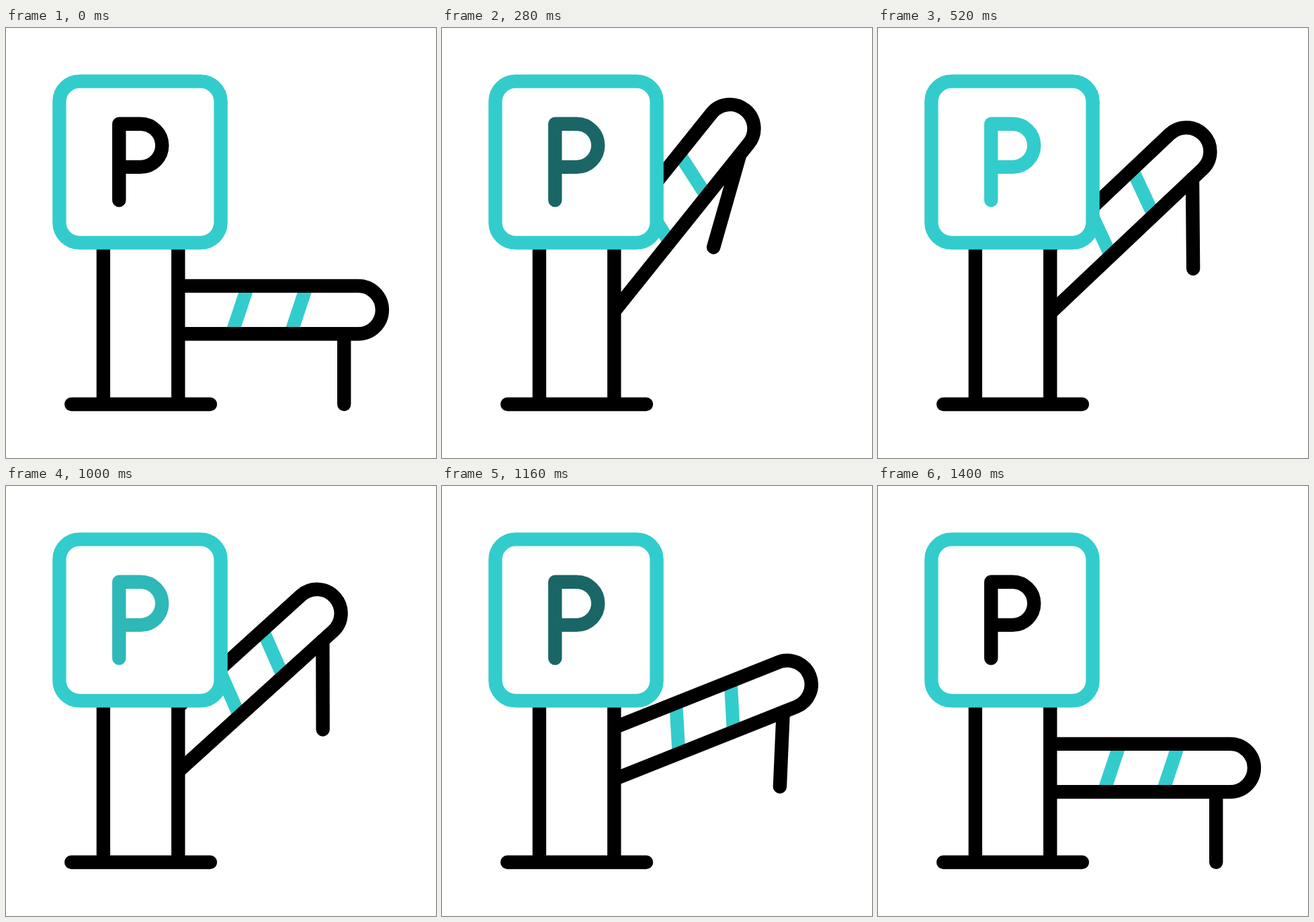
Recreate the animation shown at these times as an HTML page. Size 640 by 640 pixels, loop 2000 ms.

```html
<!DOCTYPE html>
<html lang="en">
<head>
<meta charset="utf-8">
<title>Parking barrier</title>
<style>
  html, body { margin: 0; height: 100%; overflow: hidden; background: #fff; }
  svg { display: block; width: 100%; height: 100%; }
  .line { fill: none; stroke: #000; stroke-width: 20.4; stroke-linecap: round; stroke-linejoin: round; }
  .teal { stroke: #3cc; }
  .white { fill: #fff; }
</style>
</head>
<body>
<svg viewBox="0 0 640 640">
  <g id="barrier">
    <path fill="#3cc" d="M349.4 384h21l-23.7 71h-21z m87.6 0h21l-23.7 71h-21z"/>
    <path id="leg" class="line"/>
    <path class="line" d="M180 383.9H524.2a35.7 35.7 0 0 1 0 71.4H180"/>
  </g>
  <path class="white" d="M144.9 320H256.3V560H144.9z"/>
  <path class="line" d="M144.9 320V560M256.3 320V560M97.2 560H304"/>
  <rect class="line teal white" style="fill:#fff" x="79.4" y="79.4" width="240.2" height="240.2" rx="30"/>
  <path id="letter" class="line" d="M168.3 256.4V142.7H200.2a32.1 32.1 0 0 1 0 64.2H168.3"/>
</svg>
<script>
  const LOOP = 2000, STEP = 40, MOVE = 400, OPEN_AT = 80, CLOSE_AT = 960, PEAK = 0.6;
  const PIVOT = '195.3 384';

  // Each pose: barrier angle, then the free end of the leg in the barrier's own frame.
  const CLOSED = [0, 503.2, 560];
  const OVERSHOOT = [55.4, 360.2, 507];
  const OPEN = [43.4, 412, 553.4];

  const [barrier, leg, letter] =
    ['barrier', 'leg', 'letter'].map(id => document.getElementById(id));

  const clamp = x => Math.min(1, Math.max(0, x));
  const ease = x => x * x * (3 - 2 * x);
  const blend = (from, to, x) => from.map((v, i) => v + (to[i] - v) * ease(x));

  function opening(p) {
    return p < PEAK
      ? blend(CLOSED, OVERSHOOT, p / PEAK)
      : blend(OVERSHOOT, OPEN, (p - PEAK) / (1 - PEAK));
  }

  function draw(now) {
    const t = Math.floor((now % LOOP) / STEP) * STEP;
    const up = clamp((t - OPEN_AT) / MOVE);
    const down = clamp((t - CLOSE_AT) / MOVE);
    const [angle, x, y] = down > 0 ? blend(OPEN, CLOSED, down) : opening(up);
    const tint = up - down;

    barrier.setAttribute('transform', `rotate(${-angle} ${PIVOT})`);
    leg.setAttribute('d', `M503.2 455.3L${x} ${y}`);
    letter.style.stroke = `rgb(${51 * tint}, ${204 * tint}, ${204 * tint})`;
  }

  function loop() {
    draw(performance.now());
    requestAnimationFrame(loop);
  }
  loop();
</script>
</body>
</html>
```
